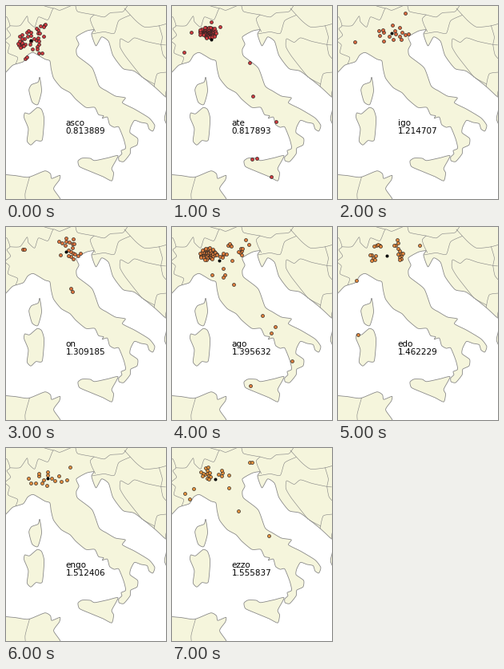
Write a matplotlib script that moves like this. It is 200 by 242 pixels and loops after 8000 ms.

```python
import numpy as np
import matplotlib.pyplot as plt
from matplotlib.animation import FuncAnimation

W, H, DPI = 200, 242, 100
PX = 72 / DPI
SCALE = 15.8  # pixels per degree of longitude
LAND, LINE = "#f5f5dc", "#858585"


def project(points):
    """Mercator: longitude and latitude to stage pixels."""
    lon, lat = np.array(points, float).T
    merc = np.degrees(np.log(np.tan(np.radians(45 + lat / 2))))
    return np.column_stack([90 + SCALE * (lon - 12.43),
                            191 - SCALE * (merc - 41.29)])


def smooth(points, closed=False, tension=0.3, steps=6):
    """Cardinal spline through the key points."""
    p = project(points)
    q = np.vstack([p[-1:], p, p[:2]] if closed else [p[:1], p, p[-1:]])
    t = np.linspace(0, 1, steps, endpoint=False)[:, None]
    parts = []
    for a, b, c, d in zip(q, q[1:], q[2:], q[3:]):
        m, n = tension * (c - a), tension * (d - b)
        parts.append(b + m * t + (3 * (c - b) - 2 * m - n) * t**2
                     + (2 * (b - c) + m + n) * t**3)
    return np.vstack(parts + [q[-2:-1]])


west = [
    (6, 43.1), (6.65, 43.25), (7.27, 43.7), (8.1, 43.9), (8.45, 44.28),
    (8.9, 44.42), (9.8, 44.05), (10.2, 43.95), (10.3, 43.5), (10.5, 42.95),
    (11.1, 42.4), (11.8, 42.1), (12.25, 41.72), (13.05, 41.23),
    (13.75, 41.23), (14.05, 40.8), (14.45, 40.73), (14.35, 40.58),
    (14.75, 40.65), (14.93, 40.2), (15.3, 40.03), (15.65, 40.05),
    (16.05, 39.3), (16.2, 38.75), (15.85, 38.6), (15.9, 38.4),
    (15.65, 38.2), (15.68, 37.97), (16.05, 37.92)]
south = [
    (16.55, 38.4), (16.6, 38.75), (17.1, 38.95), (17.15, 39.35),
    (16.55, 39.7), (16.6, 40.05), (16.9, 40.45), (17.4, 40.33),
    (17.9, 40.25), (18.05, 39.93), (18.35, 39.8), (18.5, 40.15)]
east = [
    (18.05, 40.6), (16.9, 41.13), (15.95, 41.5), (16.18, 41.8),
    (15.4, 41.9), (14.7, 42.2), (14.1, 42.5), (13.55, 43.55),
    (12.4, 44.22), (12.3, 44.6), (12.5, 44.9), (12.3, 45.3), (13.1, 45.63),
    (13.7, 45.7), (13.5, 45.45), (13.85, 44.8), (14.3, 45.3),
    (14.85, 45.05), (15.2, 44.25), (16, 43.5), (16.9, 43.35), (18.4, 42.5),
    (19.2, 41.95), (19.55, 41.7), (19.4, 41), (19.3, 40.45), (20.2, 39.7),
    (20.2, 48), (6, 48)]
corsica = [(9.4, 43), (9.55, 42.2), (9.25, 41.4), (8.8, 41.55),
           (8.55, 42.25), (8.75, 42.57), (9.27, 42.72)]
sardinia = [(9.2, 41.22), (9.55, 41.1), (9.75, 40.55), (9.6, 39.25),
            (9.1, 39.22), (8.7, 38.95), (8.4, 39.2), (8.5, 39.95),
            (8.17, 40.6), (8.22, 40.9), (8.6, 40.85)]
sicily = [(12.43, 37.95), (12.75, 38.13), (13.4, 38.12), (13.75, 37.98),
          (14.8, 38.15), (15.6, 38.28), (15.1, 37.5), (15.25, 37.2),
          (15.1, 36.7), (14.4, 36.97), (13.4, 37.3), (12.55, 37.6)]
africa = [(6, 36.95), (7.3, 37.05), (8.5, 36.93), (9.8, 37.33),
          (10.25, 37.15), (10.35, 36.85), (11, 37.05), (10.95, 36.75),
          (10.5, 36.2), (11.05, 35.5), (11.1, 34.5), (6, 34.5)]

borders = [
    # France, Switzerland and Austria
    [(7.5, 43.77), (7.65, 44.15), (6.9, 44.4), (7, 44.85), (6.65, 45.1),
     (7.1, 45.4), (6.8, 45.75), (7.05, 45.92), (6.8, 46.4), (6.3, 46.4)],
    [(7.05, 45.92), (7.85, 45.93), (8.4, 46.45), (8.5, 46.15), (9, 45.85),
     (9.3, 46.4), (10.05, 46.25), (10.47, 46.87), (11, 46.77), (12.15, 47.07),
     (12.4, 46.7), (13.7, 46.52), (14.5, 46.4), (15, 46.63), (16, 46.7),
     (16.5, 47.2)],
    [(9.6, 47.3), (9.6, 47.05), (10.47, 46.87)],
    # Slovenia, Croatia and Hungary
    [(13.7, 46.52), (13.4, 46.3), (13.55, 45.95), (13.8, 45.6)],
    [(13.55, 45.47), (14.5, 45.58), (15.3, 45.5), (15.65, 46.2),
     (16.55, 46.5)],
    [(16.1, 46.87), (17, 46.2), (17.7, 45.85), (18.85, 45.92), (20, 46.15)],
    # Bosnia, Serbia and Montenegro
    [(17.5, 43), (16.2, 44.2), (15.75, 44.75), (15.8, 45.2), (16.4, 45),
     (16.9, 45.25), (17.8, 45.05), (19, 44.87), (19.35, 44.85)],
    [(18.85, 45.92), (19.1, 45.3), (19, 44.87), (19.15, 44.3), (19.5, 44)],
    [(19.5, 43.3), (18.7, 43.2), (18.45, 42.47)],
    [(17.6, 42.95), (18.5, 42.6)],
    [(19.35, 41.9), (19.4, 42.2), (19.7, 42.6)],
    # Tunisia
    [(8.6, 36.95), (8.25, 35.9), (8.3, 35.3)]]

# Name ending, value, groups (count, x, y, spread x, spread y), lone towns
scenes = [
    ("asco", 0.813889,
     [(26, 33, 41, 16, 15), (9, 18, 48, 4, 5), (4, 46, 24, 7, 2)],
     [(24, 66), (26, 64), (41, 59), (45, 59)]),
    ("ate", 0.817893, [(75, 45, 33, 11, 7)],
     [(24, 33), (15, 58), (49, 20), (60, 26), (97, 71), (101, 113),
      (130, 145), (100, 192), (106, 191), (124, 214)]),
    ("igo", 1.214707, [(16, 68, 35, 22, 11)], [(84, 9), (21, 45)]),
    ("on", 1.309185, [(12, 82, 27, 6, 14), (5, 73, 18, 7, 6)],
     [(21, 28), (23, 28), (68, 35), (90, 36), (93, 33), (81, 77), (83, 81)]),
    ("ago", 1.395632,
     [(45, 45, 34, 11, 8), (6, 62, 35, 7, 4), (6, 86, 31, 3, 6),
      (4, 72, 23, 3, 2)],
     [(92, 16), (96, 22), (75, 42), (64, 52), (66, 60), (64, 63), (50, 60),
      (77, 72), (113, 111), (129, 125), (124, 133), (150, 168), (98, 199)]),
    ("edo", 1.462229,
     [(5, 50, 23, 5, 2), (6, 43, 39, 4, 7), (8, 78, 36, 4, 6),
      (5, 74, 21, 4, 7)],
     [(102, 23), (23, 67), (25, 135)]),
    ("engo", 1.512406, [(15, 52, 38, 26, 10)], [(80, 24)]),
    ("ezzo", 1.555837, [(13, 43, 32, 7, 9), (4, 61, 31, 7, 4)],
     [(97, 18), (100, 18), (71, 34), (71, 50), (27, 51), (16, 57), (22, 64),
      (83, 79), (121, 110)])]


def scatter(seed, groups, lone):
    """Evenly fill each group's ellipse, slightly shaken."""
    rng = np.random.default_rng(seed)
    parts = [np.array(lone, float)]
    for n, x, y, rx, ry in groups:
        k = np.arange(n)
        r = np.sqrt((k + 0.5) / n)
        a = 2.4 * k + rng.uniform(-0.5, 0.5, n)
        parts.append(np.column_stack([x + rx * r * np.cos(a),
                                      y + ry * r * np.sin(a)]))
    return np.vstack(parts)


def tint(value):
    t = np.clip((value - 0.81) / 0.75, 0, 1)
    return tuple((1 - t) * np.array([0.80, 0.22, 0.24])
                 + t * np.array([0.89, 0.57, 0.24]))


fig = plt.figure(figsize=(W / DPI, H / DPI), dpi=DPI, facecolor="white")
ax = fig.add_axes([0, 0, 1, 1])
ax.set(xlim=(0, W), ylim=(H, 0))
ax.axis("off")

for coast in (west + south + east, corsica, sardinia, sicily, africa):
    ax.fill(*smooth(coast, closed=True).T, facecolor=LAND, edgecolor=LINE,
            lw=0.8 * PX, joinstyle="round")
for border in borders:
    ax.plot(*smooth(border).T, color=LINE, lw=0.6 * PX)

towns, = ax.plot([], [], "o", ms=4 * PX, mec="#202020", mew=0.6 * PX, zorder=4)
center, = ax.plot([], [], "o", ms=4 * PX, color="black", mew=0, zorder=5)
style = dict(family="DejaVu Sans", size=10.4 * PX, color="black", zorder=6)
ending = ax.text(74.7, 149.5, "", **style)
number = ax.text(74.7, 160, "", **style)


def draw(i):
    name, value, groups, lone = scenes[i]
    places = scatter(i, groups, lone)
    towns.set_data(*places.T)
    towns.set_markerfacecolor(tint(value))
    x, y = places.mean(axis=0)
    center.set_data([x], [y])
    ending.set_text(name)
    number.set_text(f"{value:.6f}")
    return towns, center, ending, number


anim = FuncAnimation(fig, draw, frames=len(scenes), interval=1000,
                     repeat=True, repeat_delay=0)
plt.show()
```
